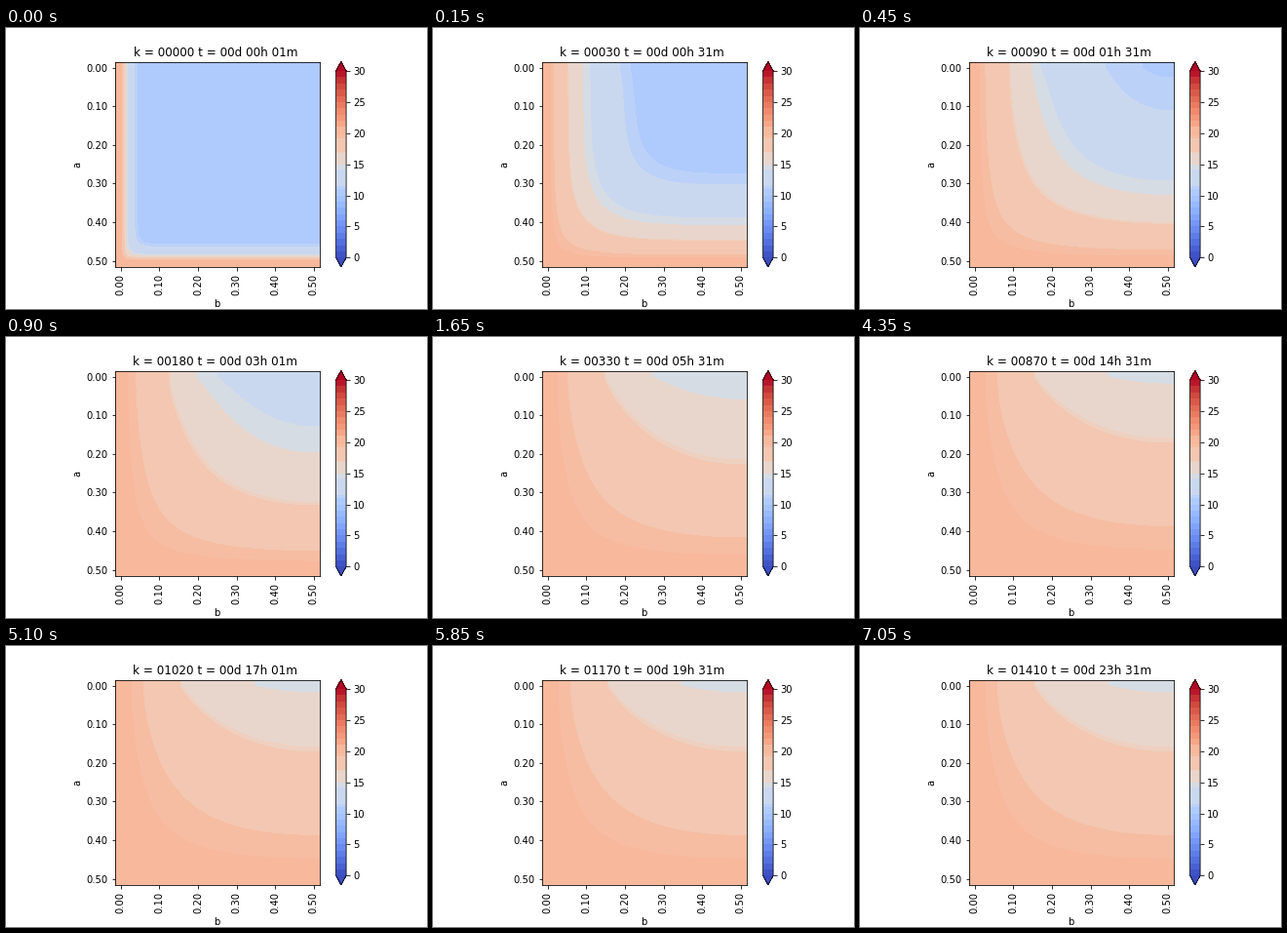
Animation of 432x288 px, one loop 7200 ms. Source, as a matplotlib script:

```python
import numpy as np
import matplotlib.pyplot as plt
from matplotlib.animation import FuncAnimation
from matplotlib.colors import BoundaryNorm, ListedColormap
from matplotlib.cm import ScalarMappable

W, H, DPI = 432, 288, 72
FRAMES, INTERVAL, SKIP = 48, 150, 30

# Plate 0.5 x 0.5: warm left and bottom, mirrored right, cooled top
N, SIZE = 32, 0.5
D = SIZE / N
ALPHA, DT = 5.0e-6, 60
T_WALL, T_START, T_AIR = 20, 10, 10
BIOT, COOL_FROM = 3.3, 0.155


def laplace(mirror_first):
    """1D second difference, fixed value at one end and mirror at the other."""
    m = (np.eye(N, k=1) + np.eye(N, k=-1) - 2 * np.eye(N)) / D**2
    if mirror_first:
        m[0, 1] *= 2
    else:
        m[-1, -2] *= 2
    return m


def with_rim(inner):
    """Add the wall nodes and one ghost layer all round."""
    t = np.full((N + 3, N + 3), float(T_WALL))
    t[1:-2, 2:-1] = inner
    t[1:-2, -1] = t[1:-2, -3]
    t[0] = t[1]
    return t + 1e-9  # keeps the untouched start value inside its band


def solve():
    """Implicit time steps; one field for every SKIP steps."""
    eye = np.eye(N)
    op = np.kron(laplace(True), eye) + np.kron(eye, laplace(False))
    loss = np.zeros((N, N))
    loss[0, D * np.arange(1, N + 1) >= COOL_FROM] = 2 * BIOT / D
    loss = loss.ravel()
    op -= np.diag(loss)
    steady = np.linalg.solve(op, loss * (T_WALL - T_AIR))
    step = np.linalg.inv(np.eye(N * N) - ALPHA * DT * op)
    jump = np.linalg.matrix_power(step, SKIP)
    dev = step @ (T_START - T_WALL - steady)
    fields = []
    for _ in range(FRAMES):
        fields.append(with_rim((steady + dev).reshape(N, N) + T_WALL))
        dev = jump @ dev
    return fields


# Band edges, and the value whose colour fills each band
LEVELS = [*range(12), 11.5, 14.15, 15, 16.9, 17.05, 19.12, 19.6, *range(21, 31)]
TONES = [*np.arange(0.5, 11), 11.5, 13, 14.2, 16.4, 17.3, 18.4, 19.5, 20,
         *np.arange(21.5, 30)]
cool = plt.get_cmap("coolwarm")
cmap = ListedColormap(cool(np.array(TONES) / 30))
cmap.set_under(cool(0.0))
cmap.set_over(cool(1.0))
norm = BoundaryNorm(LEVELS, cmap.N)

grid = D * np.arange(-1, N + 2)
fields = solve()

fig, ax = plt.subplots(figsize=(W / DPI, H / DPI), dpi=DPI)
fig.subplots_adjust(bottom=0.15)
ax.set(xlim=(grid[0], grid[-1]), ylim=(grid[-1], grid[0]),
       xlabel="b", ylabel="a", aspect="equal")
ticks = np.arange(6) / 10
labels = [f"{v:.2f}" for v in ticks]
ax.set_xticks(ticks, labels, rotation=90)
ax.set_yticks(ticks, labels)
title = ax.set_title("")

bar = fig.colorbar(ScalarMappable(norm, cmap), ax=ax, extend="both",
                   spacing="proportional", ticks=range(0, 31, 5))
bar.ax.tick_params(which="minor", length=0)
shown = []


def update(i):
    while shown:
        shown.pop().remove()
    shown.append(ax.contourf(grid, grid, fields[i], levels=LEVELS, cmap=cmap,
                             norm=norm, extend="both"))
    k = i * SKIP
    hours, minutes = divmod(k + 1, 60)
    days, hours = divmod(hours, 24)
    title.set_text(f"k = {k:05d} t = {days:02d}d {hours:02d}h {minutes:02d}m ")
    return [title]


anim = FuncAnimation(fig, update, frames=FRAMES, interval=INTERVAL,
                     repeat=True, repeat_delay=0, blit=False)
plt.show()
```
